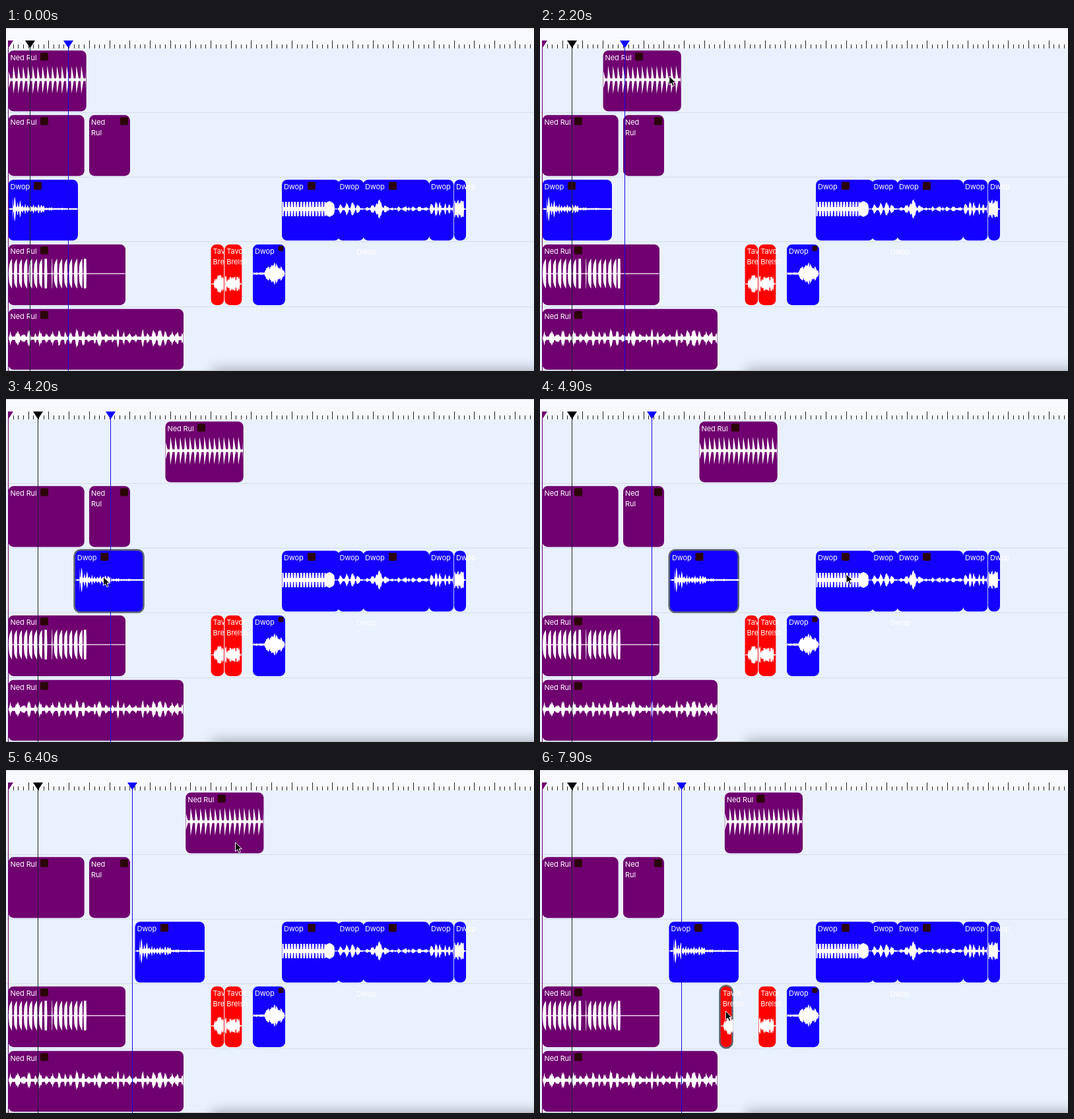
An HTML page that plays this animation: 800 by 521 pixels, repeating every 8000 ms.

```html
<!DOCTYPE html>
<html lang="en">
<head>
<meta charset="utf-8">
<title>Audio timeline</title>
<style>
  html, body { margin: 0; width: 100%; height: 100%; overflow: hidden; background: #eaf1fe; }
  svg { display: block; width: 800px; height: 521px; }
  text { font: 11px Inter, Roboto, sans-serif; letter-spacing: -0.1px; fill: #fff; }
</style>
</head>
<body>
<svg id="stage" viewBox="0 0 800 521">
  <defs>
    <filter id="soft" x="-20%" y="-200%" width="140%" height="500%">
      <feGaussianBlur stdDeviation="9"/>
    </filter>
  </defs>
</svg>
<script>
const LOOP = 8000, STEP = 100;
const ORIGIN = 3.5, GRID = 7.677, ROW_TOP = 34.2, ROW_PITCH = 98.15, CLIP_H = 92.3;
const PURPLE = '#700070', BLUE = '#1400ff', RED = '#ff0000', INK = '#000';
const ANN = 'Ned Rul', BAND = 'Dwop', GUEST = ['Tavor', 'Brelsh'];
const stage = document.getElementById('stage');
const slotX = slot => ORIGIN + slot * GRID;

function add(parent, tag, attrs, label) {
  const el = document.createElementNS('http://www.w3.org/2000/svg', tag);
  for (const k in attrs) el.setAttribute(k, attrs[k]);
  if (label) el.textContent = label;
  parent.appendChild(el);
  return el;
}
const box = (parent, x, y, width, height, fill, rx = 0) =>
  add(parent, 'rect', { x, y, width, height, fill, rx });

// Wave shapes: each gives the half height at x pixels from the clip's left edge.
const frac = v => v - Math.floor(v);
const random = n => frac(Math.sin(n * 12.9898 + 4.1) * 43758.5453);
const within = (x, a, b) => x >= a && x <= b;
const bump = (x, centre, half) => Math.sqrt(Math.max(0, 1 - Math.abs(x - centre) / half));

// Random syllables, one in each slot of the given width, with a ragged edge.
function speech(x, seed, width = 10) {
  const n = Math.floor(x / width) + seed * 50;
  const centre = (frac(x / width) - 0.35 - 0.3 * random(n)) * width;
  const half = width * (0.2 + 0.25 * random(n + 0.3));
  const loud = (0.4 + 0.6 * random(n + 0.6)) * bump(centre, 0, half);
  return Math.max(0.12, loud) * (1 - 0.55 * random(Math.floor(x) + seed));
}

const waves = {
  beat(x) {
    const p = frac((x + 0.7) / 7.35);
    return Math.max(2, (x < 4 ? 14 : 22) * (p < 0.12 ? p / 0.12 : 1 - (p - 0.12) / 0.5));
  },
  loud(x) {
    if (within(x, 55, 58.5) || within(x, 114.5, 118)) return 22.5;
    const p = frac((x - 1) / 7.6);
    const playing = within(x, 1, 54) || within(x, 66, 113);
    return playing && p < 0.62 ? 9 + 14 * Math.sqrt(p / 0.62) : 0;
  },
  riff(x) {
    if (x > 66) return 12 * bump(x, 72, 8) ** 0.5;
    return frac(x / 4.6) < 0.65 ? 11 : 3;
  },
  fall: x => x < 7 ? 3 * speech(x, 1) : 1 + 34 * Math.exp((7 - x) / 22) * speech(x, 4, 4) + 8 * bump(x, 50, 6) * speech(x, 2, 4),
  talk: x => 1 + 17 * speech(x, 3, 9),
  hits: x => 24 * Math.exp(-x / 45) * speech(x, 7, 9),
  song: x => (6 + 18 * bump(x, 22, 14)) * Math.max(speech(x, 5), 0.8 * speech(x + 4, 6, 7)),
  taps: x => 18 * speech(x, 8, 7),
  stub: x => x < 15 ? 15 * (1 - 0.5 * random(Math.floor(x))) : 1,
  wordA: x => 17 * bump(x, 13, 9) * (1 - 0.5 * random(Math.floor(x))),
  wordB: x => x < 23 ? 13 * (1 - 0.7 * random(Math.floor(x / 1.5) + 5)) : 1,
  swell: x => (2 + 16 * bump(x, 33, 15)) * (1 - 0.5 * random(Math.floor(x)))
};

function wavePath(width, mid, height) {
  const top = [], bottom = [];
  for (let x = 0.5; x <= width - 0.5; x += 0.5) {
    const h = Math.max(0.6, height(x));
    top.push(`${x},${(mid - h).toFixed(1)}`);
    bottom.unshift(`${x},${(mid + h).toFixed(1)}`);
  }
  return 'M' + top.concat(bottom).join('L') + 'Z';
}

function makeClip({ row, x = ORIGIN, w, fill, lines, badge, size = 12, wave, drop = 0 }) {
  const y = ROW_TOP + row * ROW_PITCH;
  const group = add(stage, 'g', {});
  const ring = add(group, 'rect', { x: -1, y: -1, width: w - 1, height: CLIP_H + 2, rx: 9,
    fill: 'none', stroke: '#5f6672', 'stroke-width': 3 });
  const body = box(group, 0, 0, w, CLIP_H, fill, 8);
  if (wave) add(group, 'path', { d: wavePath(w, 44.4 + drop, waves[wave]), fill: '#fff' });
  lines.forEach((line, i) => add(group, 'text', { x: 3, y: 14.8 + i * 15.6 }, line));
  if (badge) box(group, badge, size < 12 ? 2 : 3.2, size, size, '#2b0505', 2);
  const place = (left, held) => {
    group.setAttribute('transform', `translate(${left + (held ? 1.5 : 0)} ${y})`);
    body.setAttribute('width', held ? w - 3 : w);
    ring.setAttribute('visibility', held ? 'visible' : 'hidden');
  };
  place(x, false);
  return place;
}

// Backdrop, ruler and lanes
box(stage, 0, 0, 800, 521, '#eaf1fe');
box(stage, 0, 0, 800, 31, '#f7f9fd');
box(stage, 0, 0, 800, 1, '#d3d5d9');
for (let i = 0; slotX(i) < 800; i++) {
  const tall = i % 4 === 0;
  box(stage, Math.floor(slotX(i)), tall ? 19 : 25, 1, tall ? 12 : 6, '#222');
}
for (let i = 1; i < 5; i++) box(stage, 0, Math.round(30 + i * ROW_PITCH), 800, 1, '#d5dde9');
add(stage, 'rect', { x: 312, y: 517, width: 600, height: 40, fill: '#777b84', opacity: 0.55, filter: 'url(#soft)' });
box(stage, 0, 520, 800, 1, '#b9bdc5');

// Clips
const ann = (row, w, wave) => makeClip({ row, w, fill: PURPLE, lines: [ANN], badge: 48.5, wave });
const band = (x, w, wave, badge) => makeClip({ row: 2, x, w, fill: BLUE, lines: [BAND], badge, wave });
const guest = (x, w, wave) => makeClip({ row: 3, x, w, fill: RED, lines: GUEST, wave, drop: 15.5 });

const beat = ann(0, 118.2, 'beat');
ann(1, 115.2);
makeClip({ row: 1, x: 126, w: 62, fill: PURPLE, lines: ANN.split(' '), badge: 47 });
const fall = band(ORIGIN, 105.5, 'fall', 38.5);
band(418, 87.5, 'riff', 39);
band(502.5, 40, 'hits');
band(541, 100.5, 'song', 39);
band(641, 37.2, 'taps');
band(679, 18, 'stub');
ann(3, 177.5, 'loud');
const word = guest(slotX(40), 19.6, 'wordA');
guest(331.3, 26, 'wordB');
makeClip({ row: 3, x: 374, w: 49, fill: BLUE, lines: [BAND], badge: 38.5, size: 8, wave: 'swell' });
add(stage, 'text', { x: 531, y: 343.5 }, BAND);
ann(4, 265.5, 'talk');

// Markers
function makeMarker(color, lineColor) {
  const g = add(stage, 'g', {});
  box(g, -0.5, 30, 1, 491, lineColor);
  add(g, 'path', { d: 'M-7.5 19H7.5L0 30.5Z', fill: color });
  return x => g.setAttribute('transform', `translate(${Math.floor(x) + 0.5} 0)`);
}
box(stage, 3, 30, 1, 491, PURPLE);
add(stage, 'path', { d: 'M3 19H11L3.5 30.5H3Z', fill: PURPLE });
const pauseMark = makeMarker(INK, '#1c2733');
const playMark = makeMarker('#0a00ff', '#1608e0');

const pointer = add(stage, 'path', { d: 'M0 0V13.5L3.2 10.7L5.4 15.6L7.7 14.6L5.6 9.8H9.8Z',
  fill: INK, stroke: '#fff', 'stroke-width': 1 });

// Drags run in ruler slots; grab is the pointer's offset in the clip, ringEnd when its outline goes.
const drags = [
  { clip: beat, start: 1800, end: 2800, from: 0, to: 31, grab: 97, y: 73, ringEnd: 0 },
  { clip: fall, start: 3800, end: 4600, from: 0, to: 25, grab: 48, y: 270, ringEnd: 5000 },
  { clip: beat, start: 5900, end: 6500, from: 31, to: 36, grab: 74, y: 110, ringEnd: 0 },
  { clip: word, start: 7300, end: 7800, from: 40, to: 35, grab: 9, y: 366, ringEnd: LOOP }
];
const rests = [[1500, 60, 120], [3300, 308, 104], [4900, 464, 266]];
const path = rests.concat(drags.flatMap(d => [
  [d.start, slotX(d.from) + d.grab, d.y], [d.end, slotX(d.to) + d.grab, d.y]
])).sort((a, b) => a[0] - b[0]);

function pointAt(t) {
  const i = path.findIndex(k => k[0] > t);
  if (i <= 0) return path[i < 0 ? path.length - 1 : 0].slice(1);
  const a = path[i - 1], b = path[i], p = (t - a[0]) / (b[0] - a[0]);
  return [a[1] + (b[1] - a[1]) * p, a[2] + (b[2] - a[2]) * p];
}

function draw(t) {
  playMark(94.8 + t * 0.01515);
  pauseMark(36.5 + Math.min(t, 770) * 0.01515);
  const placed = new Set();
  for (const d of drags) {
    if (placed.has(d.clip) && t < d.start) continue;
    const p = Math.min(1, Math.max(0, (t - d.start) / (d.end - d.start)));
    d.clip(slotX(Math.round(d.from + (d.to - d.from) * p)), t >= d.start && t < d.ringEnd);
    placed.add(d.clip);
  }
  pointer.setAttribute('transform', `translate(${pointAt(t)})`);
  pointer.setAttribute('visibility', t < rests[0][0] ? 'hidden' : 'visible');
}

const start = performance.now();
function tick() {
  const t = (performance.now() - start) % LOOP;
  draw(Math.floor(t / STEP) * STEP);
  requestAnimationFrame(tick);
}
tick();
</script>
</body>
</html>
```
